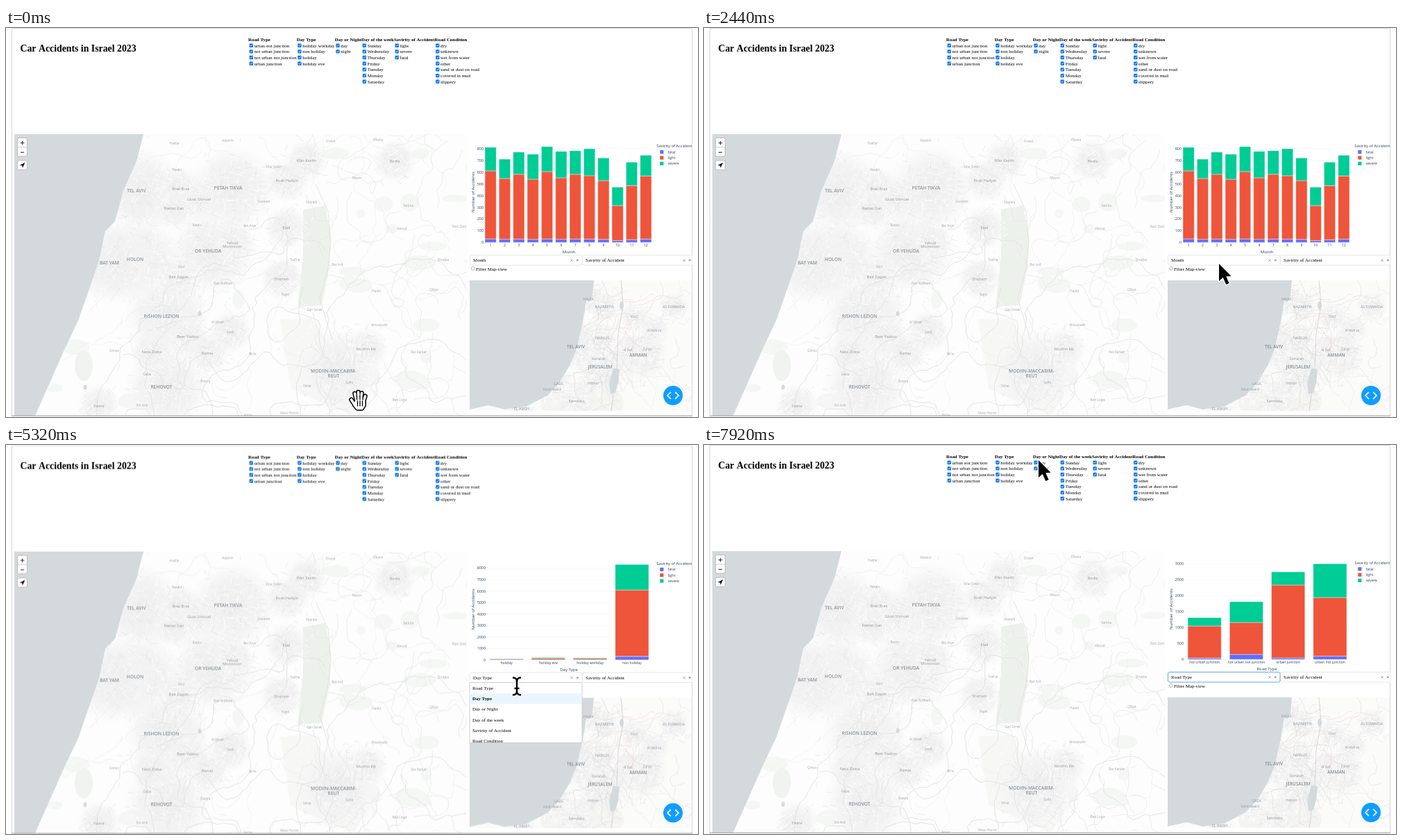
Animation, 997 px wide and 561 px high, one loop 8 s. Source, as an HTML page with a canvas:

```html
<!DOCTYPE html>
<html lang="en">
<head>
<meta charset="utf-8">
<title>Car Accidents dashboard</title>
<style>
html, body { margin: 0; width: 100%; height: 100%; overflow: hidden; background: #fff; }
canvas { display: block; }
</style>
</head>
<body>
<canvas id="stage" width="997" height="561"></canvas>
<script>
const W = 997, H = 561, LOOP = 8000;
const SERIF = '"Liberation Serif", serif', SANS = '"Open Sans", sans-serif';
const screen = document.getElementById('stage').getContext('2d');
const page = document.createElement('canvas');
page.width = W; page.height = H;
let c = page.getContext('2d');

let seed = 7;
const rnd = () => (seed = (seed * 16807) % 2147483647) / 2147483647;
const spread = r => (rnd() + rnd() + rnd() - 1.5) * r;
const between = (a, b) => a + rnd() * (b - a);
const repeat = (n, f) => { for (let i = 0; i < n; i++) f(i); };

function text(s, x, y, font, color = '#000', align = 'left') {
  c.font = font; c.fillStyle = color; c.textAlign = align;
  c.fillText(s, x, y);
  return c.measureText(s).width;
}
const serif = (s, x, y, bold) => text(s, x, y, `${bold ? 'bold ' : ''}6.9px ${SERIF}`);
const sans = (s, x, y, size = 5.4, align = 'center') => text(s, x, y, `${size}px ${SANS}`, '#2a3f5f', align);
function box(x, y, w, h, fill, stroke, r = 0, width = 1) {
  c.beginPath(); c.roundRect(x, y, w, h, r);
  if (fill) { c.fillStyle = fill; c.fill(); }
  if (stroke) { c.strokeStyle = stroke; c.lineWidth = width; c.stroke(); }
}
function blob(x, y, rx, ry, fill) {
  c.beginPath(); c.ellipse(x, y, rx, ry, 0, 0, 7);
  c.fillStyle = fill; c.fill();
}
function trace(pts) {
  c.beginPath();
  for (let i = 0; i < pts.length; i += 2) c.lineTo(pts[i], pts[i + 1]);
}
function poly(pts, fill) { trace(pts); c.closePath(); c.fillStyle = fill; c.fill(); }
function line(pts, color, width = 1) { trace(pts); c.strokeStyle = color; c.lineWidth = width; c.stroke(); }
function clipped(x, y, w, h, draw) {
  c.save(); c.beginPath(); c.rect(x, y, w, h); c.clip();
  draw(); c.restore();
}

// ---------- maps ----------
const SEA = '#d4dadc';
const CITIES = [[188, 235, 'TEL AVIV'], [320, 231, 'PETAH TIKVA'], [291, 322, 'OR YEHUDA'], [186, 334, 'HOLON'],
  [149, 339, 'BAT YAM'], [224, 416, 'RISHON LEZION'], [224, 518, 'REHOVOT'], [472, 495, 'MODIIN-MACCABIM-', 'REUT']];
const TOWNS = [[252, 232, 'Bnei Brak'], [278, 247, 'Givat Shmuel'], [242, 260, 'Ramat Gan'], [433, 191, 'Kfar Kasim'],
  [405, 220, 'Rosh HaAyin'], [404, 288, 'Elad'], [326, 310, 'Yehud', 'Monosson'], [397, 362, 'Shoham'], [249, 359, 'Beit Dagan'],
  [323, 438, 'Lod'], [262, 445, 'Beer Yaakov'], [210, 467, 'Ness Ziona'], [290, 469, 'Ramla'], [134, 545, 'Yavne'],
  [519, 463, "Modi'in Illit"], [560, 192, 'Bedia']];
const VILLAGES = ['Hakfar', 'Adanim', 'Oranit', 'Elkana', 'Rasala', 'Kfar Sirkin', 'Mazor', 'Ussham', 'Sharaib', 'Farkha',
  'Rantis', 'Bet Arye', 'Aboud', 'Bani Zaid', 'Azor', 'Tzafria', 'Bet Arif', 'Shuqba', 'Deir Nidham', 'Yagel', 'Hadid',
  'Qibya', 'Al Itihad', 'Gan Sorek', 'Ahisamakh', 'Gimzo', "Bil'in", 'Ras Karkar', 'Galya', 'Ezarya', 'Shilat', 'Saffa',
  'Ein Arik', "Na'an", 'Mevo Horon', 'Beit Liqya'];
const CAPITALS = [[821, 460, 'TEL AVIV'], [911, 472, 'AMMAN'], [856, 489, 'JERUSALEM']];
const REGIONAL = [[862, 402, 'NAZARETH'], [859, 447, 'NABLUS'], [839, 391, 'HAIFA'], [796, 513, 'GAZA'],
  [743, 549, 'EL ARISH'], [962, 402, 'AS SUWAYDA']];
const LOCAL = [[905, 416, 'Irbid'], [934, 436, 'Al Mafraq'], [896, 464, 'Al Salt'], [924, 463, 'Zarqa'],
  [854, 477, 'Ramallah'], [846, 512, 'Hebron'], [822, 538, 'Beersheba'], [787, 521, 'Rafah Beach']];

function road(x, y, angle, steps, size, color, width) {
  const pts = [x, y];
  repeat(steps, () => {
    angle += spread(0.9);
    pts.push(x += Math.cos(angle) * size, y += Math.sin(angle) * size);
  });
  line(pts, color, width);
}
function town(x, y, r) {
  const g = c.createRadialGradient(x, y, 0, x, y, r);
  g.addColorStop(0, '#eeeeee'); g.addColorStop(0.6, '#f3f3f3'); g.addColorStop(1, '#f5f5f500');
  c.fillStyle = g; c.fillRect(x - r, y - r, 2 * r, 2 * r);
  const tilt = rnd();
  repeat(r * 3, i => {
    const px = x + spread(r), py = y + spread(r), a = tilt + (i % 2) * Math.PI / 2, l = between(3, 11);
    line([px, py, px + Math.cos(a) * l, py + Math.sin(a) * l], i % 3 ? '#ffffff' : '#e5e5e5', 0.7);
  });
}
function labels(list, size, color, weight = 500) {
  for (const [x, y, ...lines] of list)
    lines.forEach((s, i) => text(s, x, y + size * 0.36 + i * (size - 0.3), `${weight} ${size}px ${SANS}`, color, 'center'));
}

// one village per cell of a jittered grid, clear of the bigger labels
function scatterVillages() {
  const spots = [];
  for (let y = 164; y < 555; y += 43)
    for (let x = 240 - (y - 153) * 0.3; x < 650; x += 74) {
      const p = [x + spread(18), y + spread(14)];
      if ([...CITIES, ...TOWNS].every(([a, b]) => Math.abs(a - p[0]) > 40 || Math.abs(b - p[1]) > 11)) spots.push(p);
    }
  return VILLAGES.map((s, i) => [...spots[Math.floor(i * spots.length / VILLAGES.length)], s]);
}

function bigMap() {
  box(12, 153, 652, 406, '#fdfdfd');
  repeat(34, () => blob(between(70, 650), between(160, 550), between(6, 26), between(4, 14), '#f5f7f5'));
  poly([428, 262, 460, 256, 468, 300, 466, 345, 455, 400, 420, 402, 428, 330], '#edf1ec');
  poly([395, 420, 440, 418, 520, 530, 500, 559, 410, 520], '#f7f8f6');
  blob(112, 487, 13, 22, '#f0f3ef');
  CITIES.forEach(([x, y]) => town(x + 8, y, 62));
  TOWNS.forEach(([x, y]) => town(x, y, 32));
  repeat(60, () => road(between(80, 670), between(150, 560), between(0, 6.3), 18, 6, '#eeeeee', 0.7));
  repeat(40, () => road(between(450, 660), between(150, 560), between(0, 6.3), 20, 5, '#e7e8e8', 0.8));
  repeat(10, i => road(130 + i * 42, 559, -1.35 + spread(0.4), 50, 9, '#e3e4e4', 1));
  line([446, 225, 464, 265, 468, 310, 464, 345, 452, 390, 470, 450], '#e4dcdc', 0.8);
  poly([12, 153, 198, 153, 188, 192, 169, 235, 157, 279, 143, 293, 134, 336, 104, 422, 85, 462, 42, 559, 12, 559], SEA);
  blob(114, 518, 2.5, 3.5, SEA);
  blob(279, 412, 2.5, 3.5, SEA);
  labels(CITIES, 6.7, '#8d949b', 600);
  labels(TOWNS, 5.6, '#92989d');
  labels(scatterVillages(), 4.6, '#a0a4a7');
}

function smallMap() {
  box(668, 364, 321, 188, '#fbfbfa');
  blob(830, 540, 60, 30, '#f4f4f2');
  CAPITALS.forEach(([x, y]) => town(x + 6, y, 36));
  [...REGIONAL, ...LOCAL].forEach(([x, y]) => town(x, y, 22));
  repeat(55, i => road(between(825, 990), between(364, 552), between(0, 6.3), 12, 6, i % 3 ? '#ebebeb' : '#ecdfdc', 0.7));
  repeat(14, () => road(between(835, 890), between(370, 500), 1.6, 16, 5, '#e0e1e1', 0.8));
  line([886, 364, 889, 400, 882, 440, 880, 490, 872, 552], '#d9cfd2', 0.9);
  poly([668, 364, 847, 364, 845, 386, 841, 395, 836, 393, 831, 424, 822, 463, 812, 487, 797, 512, 780, 530, 749, 546, 718, 550, 695, 544, 668, 550], SEA);
  poly([875, 491, 884, 492, 882, 512, 878, 526, 871, 528, 869, 512], SEA);
  blob(887, 400, 3, 6, SEA);
  labels(REGIONAL, 5.3, '#8d949b');
  labels(CAPITALS, 6.4, '#858d94', 600);
  labels(LOCAL, 4.6, '#9a9fa3');
}

// ---------- static page ----------
const FILTERS = [
  ['Road Type', 'urban not junction', 'not urban junction', 'not urban not junction', 'urban junction'],
  ['Day Type', 'holiday workday', 'non holiday', 'holiday', 'holiday eve'],
  ['Day or Night', 'day', 'night'],
  ['Day of the week', 'Sunday', 'Wednesday', 'Thursday', 'Friday', 'Tuesday', 'Monday', 'Saturday'],
  ['Savirity of Accident', 'light', 'severe', 'fatal'],
  ['Road Condition', 'dry', 'unknown', 'wet from water', 'other', 'sand or dust on road', 'covered in mud', 'slippery']];

function filters() {
  let x = 349;
  for (const [head, ...items] of FILTERS) {
    let width = serif(head, x, 19.2, true);
    items.forEach((s, i) => {
      const y = 25.2 + i * 8.68;
      box(x + 1.6, y - 2.7, 5.4, 5.4, '#0b74e5', null, 1);
      line([x + 2.8, y, x + 3.9, y + 1.2, x + 5.9, y - 1.4], '#fff', 0.8);
      width = Math.max(width, 8.6 + serif(s, x + 8.6, y + 2.3));
    });
    x += width;
  }
}

function buildPage() {
  box(0, 0, W, H, '#fff');
  text('Car Accidents in Israel 2023', 20.5, 34.3, `bold 13.8px ${SERIF}`);
  filters();
  clipped(12, 153, 652, 406, bigMap);
  clipped(668, 364, 321, 188, smallMap);
  box(16.5, 158.5, 14, 26.5, '#fff', '#bbb', 2);
  line([17, 172, 30, 172], '#ccc');
  line([20.8, 165.8, 26.4, 165.8], '#222'); line([23.6, 163, 23.6, 168.6], '#222');
  line([21, 179.3, 26.2, 179.3], '#222');
  box(16.5, 191, 14, 13.5, '#fff', '#bbb', 2);
  poly([27.5, 194, 19.6, 197.9, 23.3, 198.4, 23.8, 202], '#111');
  line([8.5, 559, 8.5, 0.5, 988.5, 0.5, 988.5, 559], '#d6d6d6');
  line([8, 559.3, 989, 559.3], '#9a9a9a');
}

// ---------- chart ----------
const CHARTS = {
  'Month': { step: 100, max: 800, gap: 16.9, left: 688, names: [...Array(12)].map((_, i) => i + 1),
    total: [812, 711, 771, 753, 818, 777, 783, 800, 721, 472, 685, 744],
    light: [611, 546, 582, 540, 605, 552, 582, 570, 528, 315, 485, 567] },
  'Day Type': { step: 1000, max: 8000, gap: 16.55, left: 691, names: ['holiday', 'holiday eve', 'holiday workday', 'non holiday'],
    total: [110, 200, 170, 8310], light: [90, 130, 120, 6090] },
  'Road Type': { step: 500, max: 3000, gap: 23, left: 691, fatal: [45, 160, 50, 105],
    names: ['not urban junction', 'not urban not junction', 'urban junction', 'urban not junction'],
    total: [1310, 1810, 2745, 3000], light: [1050, 1160, 2335, 1942] }
};
const SEVERITY = [['fatal', '#636efa'], ['light', '#ef553b'], ['severe', '#00cc96']], BASE = 309.3;

function drawChart(key) {
  const { step, max, gap, left, names, total, light, fatal } = CHARTS[key];
  const yOf = v => BASE - v / step * gap;
  for (let v = 0; v <= max; v += step) {
    line([left + 1, yOf(v), 931.5, yOf(v)], '#f2f4f9', 0.6);
    sans(v, left, yOf(v) + 1.9, 5.4, 'right');
  }
  const slot = (932 - left) / names.length;
  names.forEach((name, i) => {
    const x = left + slot * (i + 0.5), w = slot * 0.8;
    const levels = [0, fatal ? fatal[i] : light[i] * 0.05, light[i], total[i]];
    SEVERITY.forEach(([, color], k) =>
      box(x - w / 2, yOf(levels[k + 1]), w, yOf(levels[k]) - yOf(levels[k + 1]), color, '#ffffff', 0, 0.4));
    sans(name, x, 315.2, 5.1);
  });
  sans(key, 811, 325.3, 6);
  c.save(); c.translate(675.2, 236.5); c.rotate(-Math.PI / 2);
  sans('Number of Accidents', 0, 0, 6); c.restore();
  clipped(930, 160, 58.5, 45, () => sans('Savirity of Accident', 937.3, 172.4, 5.8, 'left'));
  SEVERITY.forEach(([name, color], i) => {
    box(942.2, 176.2 + i * 8.3, 5.2, 5.2, color);
    sans(name, 953.5, 180.8 + i * 8.3, 5.4, 'left');
  });
}

// ---------- controls ----------
const OPTIONS = [...FILTERS.map(f => f[0]), 'Month'];

function select(x, w, value, focus, open) {
  box(x, 327.5, w, 14.5, '#fff', focus ? '#5aa9ef' : '#e6e6e6', 2);
  serif(value, x + 4.6, 337.2);
  const cx = x + w - 15, d = open ? -1 : 1;
  line([cx - 1.6, 333.4, cx + 1.6, 336.6], '#888', 0.7); line([cx - 1.6, 336.6, cx + 1.6, 333.4], '#888', 0.7);
  poly([cx + 6.2, 335 - d, cx + 10.4, 335 - d, cx + 8.3, 335 + d * 1.3], '#888');
}
function menu(value, scroll) {
  box(668, 342, 162, 87, '#fff', '#ccc');
  clipped(668.5, 342.5, 161, 86.3, () => OPTIONS.forEach((s, i) => {
    const y = 342.5 + i * 15.2 - scroll;
    if (s === value) box(668, y, 162, 15.2, '#ebf5ff');
    serif(s, 672, y + 9.8, s === value);
  }));
}
function codeButton() {
  blob(961, 530, 14, 14, '#119dff');
  for (const d of [-1, 1]) line([961 + d * 3.2, 525.2, 961 + d * 8, 530, 961 + d * 3.2, 534.8], '#fff', 1.7);
}

// ---------- cursors ----------
function arrow() {
  trace([0, 0, 0, 25, 5.7, 19.8, 10.2, 30, 14.6, 28.1, 10.3, 18.2, 17.6, 17.8]);
  c.closePath();
  c.strokeStyle = '#fff'; c.lineWidth = 2.4; c.stroke();
  c.fillStyle = '#000'; c.fill();
}
function beam() {
  for (const [color, width] of [['#fff', 4.4], ['#000', 2.4]]) {
    for (const d of [-1, 1]) {
      c.beginPath(); c.moveTo(-6, 12.5 * d); c.quadraticCurveTo(0, 12.5 * d, 0, 7 * d); c.quadraticCurveTo(0, 12.5 * d, 6, 12.5 * d);
      c.strokeStyle = color; c.lineWidth = width; c.stroke();
    }
    line([0, -9, 0, 9], color, width);
    line([-3.5, 3, 3.5, 3], color, width);
  }
}
function hand() {
  const fingers = [-10.5, -5.5, -0.5, 4.5, 9.5], tips = [-1, -10, -12, -10.5, -6];
  for (const [color, grow] of [['#000', 3], ['#fff', 0]]) {
    fingers.forEach((x, i) => line([x, tips[i], x * 0.6 + 1, i ? 3 : 7], color, 3.6 + grow));
    trace([-4, 2, 8, 2, 8, 7, 5, 12, -2, 12, -6, 7]); c.closePath();
    c.lineWidth = 3 + grow; c.strokeStyle = c.fillStyle = color; c.stroke(); c.fill();
  }
  for (const x of [-1.5, 2, 5.5]) line([x, 1, x, 8], '#000', 1.3);
  for (const x of [-3, 1.7, 6]) line([x, -7, x + 0.3, -1], '#000', 1.1);
}

// each move: start, end, x, y
const MOVES = [[440, 640, 513, 520], [760, 1600, 667, 158], [1760, 2440, 742, 340], [2440, 2520, 739, 345],
  [4600, 5320, 736, 348], [5440, 6160, 727, 350], [6400, 6440, 681, 304], [6440, 6600, 550, 126],
  [6720, 7560, 547, 33], [7560, 7920, 482, 22]];

function cursor(t) {
  let x = 508, y = 537;
  for (const [from, to, tx, ty] of MOVES) {
    let k = Math.min(1, Math.max(0, (t - from) / (to - from)));
    if (to - from > 200) k = k * k * (3 - 2 * k);
    x += (tx - x) * k; y += (ty - y) * k;
  }
  c.save(); c.translate(x, y);
  c.lineJoin = 'round';
  if (t < 1200) { c.lineCap = 'round'; hand(); }
  else if (t >= 4600 && t < 5440) beam();
  else arrow();
  c.restore();
}

function draw(now) {
  const t = Math.floor(now % LOOP / 40) * 40;
  const firstOpen = t >= 2560 && t < 3160, secondOpen = t >= 4600 && t < 5440, open = firstOpen || secondOpen;
  const value = t < 3160 ? 'Month' : t < 5440 ? 'Day Type' : 'Road Type';
  const chart = t < 3840 ? 'Month' : t < 6080 ? 'Day Type' : 'Road Type';
  c.fillStyle = '#fff'; c.fillRect(0, 0, W, H);
  c.save();
  if (secondOpen) c.translate(0, 0.6);
  c.drawImage(page, 0, 0);
  drawChart(chart);
  clipped(660, 325, 328.5, 30, () => {
    select(830.5, 161.5, 'Savirity of Accident');
    select(668.5, 161.5, value, t >= 3160 && !open, open);
  });
  box(670.5, 344.5, 4.6, 4.6, '#fff', '#bbb', 1);
  serif('Filter Map-view', 677, 349.6);
  if (open) menu(value, firstOpen ? 20 : 0);
  codeButton();
  c.restore();
  cursor(t);
}

buildPage();
c = screen;
const start = performance.now();
function tick() {
  draw(performance.now() - start);
  requestAnimationFrame(tick);
}
tick();
</script>
</body>
</html>
```
